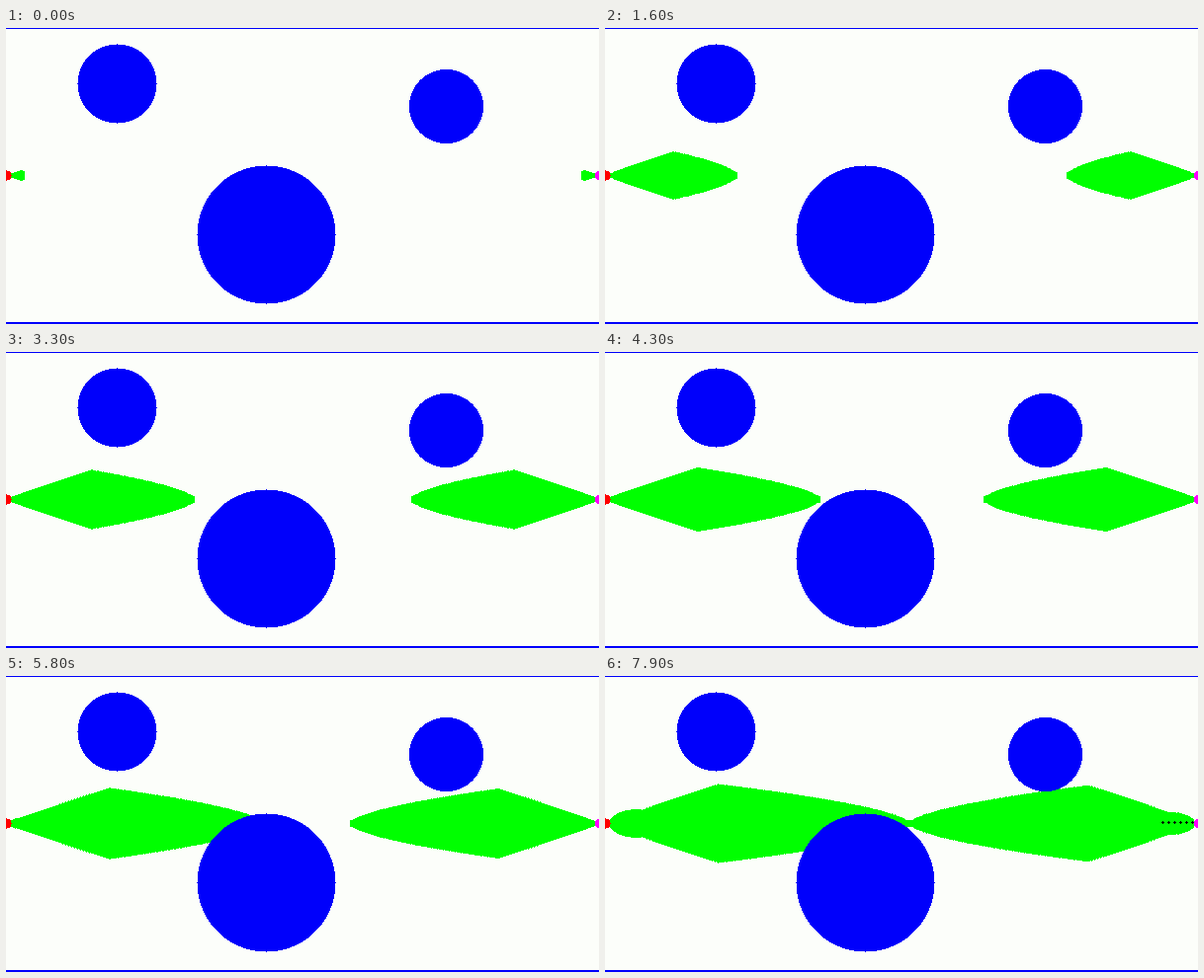
Animation of 600x300 px, one loop 8 s. Source, as an HTML page:

```html
<!DOCTYPE html>
<html lang="en">
<head>
<meta charset="utf-8">
<title>Two-way path search</title>
<style>
  html, body { margin: 0; width: 600px; height: 300px; overflow: hidden; background: #fcfefa; }
  svg { display: block; }
</style>
</head>
<body>
<svg width="600" height="300" viewBox="0 0 600 300" shape-rendering="crispEdges">
  <g fill="#0f0">
    <path id="left"/>
    <path id="right" transform="translate(601 0) scale(-1 1)"/>
  </g>
  <g fill="#0000fb">
    <path id="obstacles"/>
    <rect width="600" height="1"/>
    <rect y="298" width="600" height="2"/>
  </g>
  <path id="start" fill="#f00"/>
  <path id="goal" fill="#f0f"/>
  <path id="route"/>
</svg>
<script>
const LOOP = 8000, STEP = 100;
const MEET = 7800;     // both searches touch and stop growing
const BLOCKED = 4300;  // the left search runs into the large obstacle
const MID = 149.5, ROOT = 4;

const byId = id => document.getElementById(id);
const setPath = (id, d) => byId(id).setAttribute("d", d);

// Pixel disc built row by row around the pixel (cx, cy)
function disc(cx, cy, r) {
  let d = "";
  for (let dy = -Math.floor(r); dy <= r; dy++) {
    const w = Math.floor(Math.sqrt(r * r - dy * dy));
    d += `M${cx - w} ${cy + dy}h${2 * w + 1}v1h${-2 * w - 1}z`;
  }
  return d;
}

// Leaf shape: a straight wedge up to the peak, then a rounded taper to the tip.
// The root swells once the search turns back to cells near its origin.
function leaf(reach, bulge) {
  const peak = Math.min(77.5 * (reach / 160) ** 0.6, reach - 3);
  const height = 0.346 * peak;
  const upper = [], lower = [];
  for (let x = ROOT; x <= reach; x++) {
    let h = x < peak
      ? height * (x / peak) ** 0.94
      : Math.max(3.5, height * ((reach - x) / (reach - peak)) ** 0.6);
    if (x < bulge) {
      const d = (bulge - x) / (bulge - ROOT);
      h = Math.max(h, 0.4 * bulge * Math.sqrt(1 - d * d));
    }
    if (x % 3 === 0) h += 0.8;
    upper.push(`${x} ${(MID - h).toFixed(2)}`);
    lower.unshift(`${x} ${(MID + h).toFixed(2)}`);
  }
  return `M${upper.join("L")}L${lower.join("L")}Z`;
}

// Searched area grows evenly, so lengths follow the square root of time
const since = (t, begin) => Math.max(0, t - begin);
const reachAt = (t, extra = 0) => Math.sqrt(380 + 11 * t + extra);
const bulgeAt = (t, begin) => Math.sqrt(0.567 * since(t, begin));

function draw(time) {
  const t = Math.floor(time % LOOP / STEP) * STEP;
  const grown = Math.min(t, MEET);
  setPath("left", leaf(reachAt(grown, 2.6 * since(grown, BLOCKED)), bulgeAt(grown, 5500)));
  setPath("right", leaf(reachAt(grown), bulgeAt(grown, 6400)));
  byId("route").setAttribute("visibility", t > MEET ? "visible" : "hidden");
}

setPath("obstacles", disc(112, 56, 40) + disc(445, 79, 37.5) + disc(263, 209, 70));
setPath("start", disc(0, 149, 5));
setPath("goal", disc(600, 149, 4.5));
setPath("route", Array.from({ length: 6 }, (_, i) => disc(564 + 6 * i, 148, 1)).join(""));

const begun = performance.now();
function tick() {
  draw(performance.now() - begun);
  requestAnimationFrame(tick);
}
tick();
</script>
</body>
</html>
```
